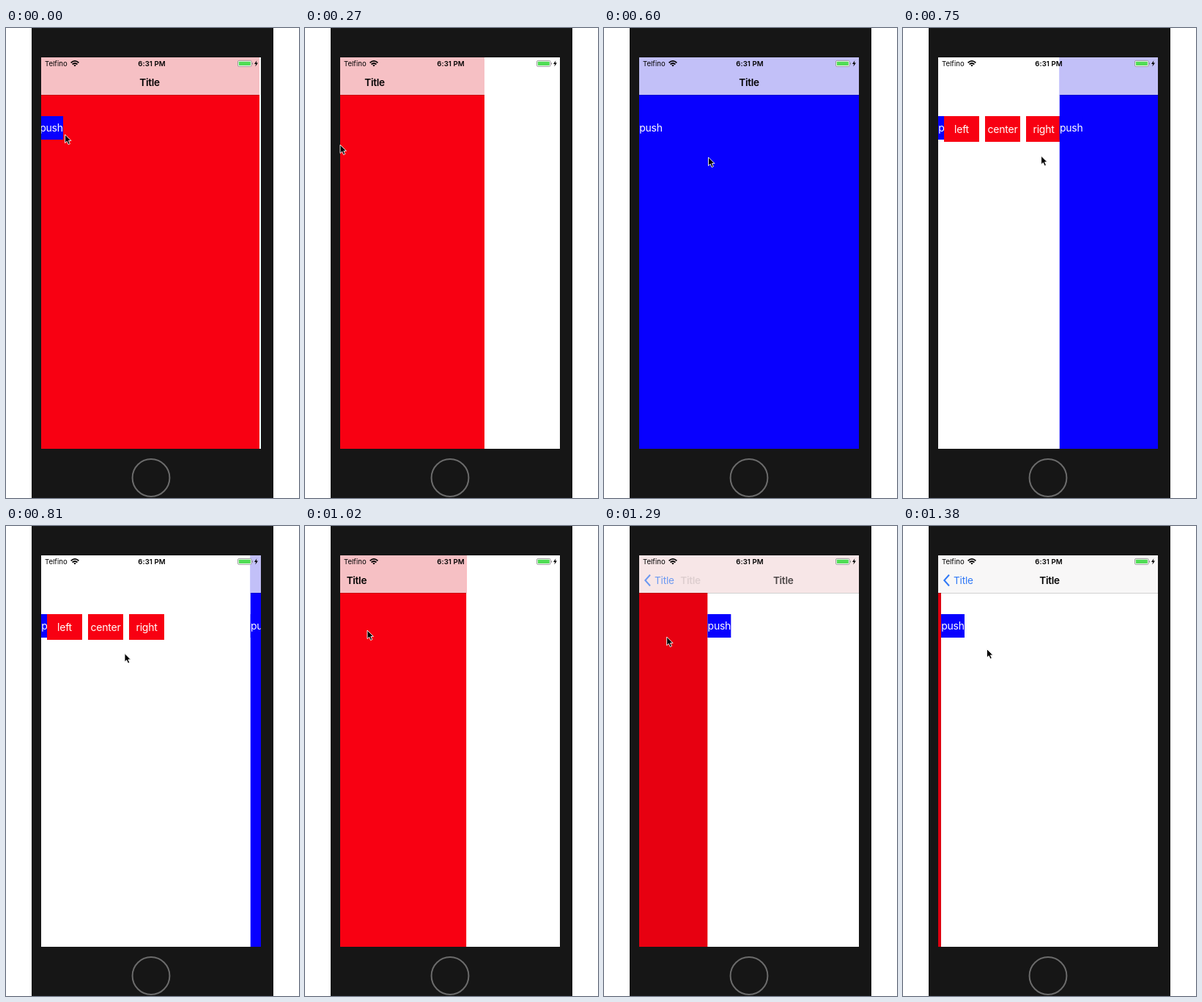
Write an HTML page that moves like this. It is 400 by 640 pixels and loops after 1410 ms.

```html
<!DOCTYPE html>
<html lang="en">
<head>
<meta charset="utf-8">
<title>Sliding pages</title>
<style>
  html, body { margin: 0; width: 100%; height: 100%; overflow: hidden; background: #fff; }
  svg { display: block; width: 400px; height: 640px; }
  text { font-family: Inter, sans-serif; fill: #000; }
  .label { font-size: 14px; letter-spacing: -.25px; fill: #fff; text-anchor: middle; }
  .title { font-size: 13.6px; font-weight: 600; letter-spacing: -.3px; text-anchor: middle; }
  .back { font-size: 13.6px; letter-spacing: -.2px; fill: #2f78f6; }
  .status { font-size: 9.6px; }
  .clock { font-weight: 600; text-anchor: middle; }
  .red { fill: #f80012; }
  .blue { fill: #0800ff; }
  .bar { fill: #f6f7f7; fill-opacity: .78; }
  .line { fill: #000; fill-opacity: .3; }
</style>
</head>
<body>
<svg viewBox="0 0 400 640">
  <defs>
    <clipPath id="screen"><rect width="300" height="533"/></clipPath>
    <g id="push">
      <rect class="blue" y="80" width="32" height="32"/>
      <text class="label" x="16" y="101">push</text>
    </g>
    <g id="navbar">
      <rect class="bar" width="300" height="51"/>
      <rect class="line" y="51" width="300" height=".6"/>
    </g>
  </defs>

  <rect x="35" width="330" height="640" fill="#161616"/>
  <circle cx="198" cy="612.5" r="25.4" fill="none" stroke="#6b6b6b" stroke-width="2"/>

  <g transform="translate(48 40)">
    <g clip-path="url(#screen)">
      <rect width="300" height="533" fill="#fff"/>
      <use href="#push"/>
      <g id="menu"></g>

      <g id="redPage" clip-path="url(#screen)">
        <g id="redBody">
          <rect class="red" width="300" height="533"/>
          <use href="#push"/>
        </g>
        <rect id="dim" width="300" height="533" opacity="0"/>
        <g id="detail">
          <rect y="51" width="300" height="482" fill="#fff"/>
          <use href="#push"/>
        </g>
        <rect class="red" width="300" height="51"/>
        <use href="#navbar"/>
        <rect id="plainBar" width="300" height="51" fill="#f8f8f8"/>
        <text id="oldTitle" class="title" y="39">Title</text>
        <text id="newTitle" class="title" y="39">Title</text>
        <g id="back">
          <path d="M15 26.5L8.3 34L15 41.5" fill="none" stroke="#2f78f6" stroke-width="2"/>
          <text class="back" x="21" y="39">Title</text>
        </g>
      </g>

      <g id="bluePage">
        <rect class="blue" width="300" height="533"/>
        <use href="#push"/>
        <use href="#navbar"/>
        <text class="title" x="150" y="39">Title</text>
      </g>
    </g>

    <text class="status" x="5" y="12">Telfino</text>
    <g fill="none" stroke="#000" stroke-width="1.7">
      <path d="M40.6 7.4Q46 2.4 51.4 7.4M42.6 9.5Q46 6.5 49.4 9.5"/>
      <path d="M44.3 10.8Q46 9.4 47.7 10.8L46 12.6Z" fill="#000" stroke="none"/>
    </g>
    <text class="status clock" x="151" y="12" letter-spacing=".1">6:31 PM</text>
    <rect x="268.5" y="4.4" width="18.6" height="8" rx="1.6" fill="#fff" stroke="#888" stroke-width=".8"/>
    <rect x="269.8" y="5.7" width="16" height="5.4" rx=".6" fill="#50dc55"/>
    <path d="M288 7v2.8q1-.3 1-1.4t-1-1.4Z" fill="#888"/>
    <path d="M294.4 4.2L291 9h2.2l-.9 3.6L296 7.6h-2.3Z"/>
  </g>

  <path id="cursor" d="M0 0V11.6L2.7 9.2L4.6 13.6L6.8 12.6L4.9 8.4H8.4Z"
        stroke="#fff" stroke-width=".9" stroke-linejoin="round"/>
</svg>
<script>
const LOOP = 1410, STEP = 30;
const $ = id => document.getElementById(id);

$('menu').innerHTML = ['left', 'center', 'right'].map((name, i) => `
  <g transform="translate(${8 + 56 * i} 80)">
    <rect class="red" width="48" height="35"/>
    <text class="label" x="24" y="22.8">${name}</text>
  </g>`).join('');

const linear = u => u;
const out = u => 1 - (1 - u) ** 2;
const smooth = u => u * u * (3 - 2 * u);

// Each key: time, value, easing of the move that ends there.
const redX = [[0, -2], [30, 0], [120, 0], [270, -103], [390, -300, out], [956, -300], [1140, 0, out]];
const blueX = [[420, 300], [570, 0, out], [640, 0], [720, 60], [839, 300, out]];
const pushed = [[1200, 0], [1403.5, 1, out]];
const cursorX = [[0, 80.5], [30, 80.5], [120, 151, smooth], [270, 48], [400, 202.5, smooth],
  [450, 202.5], [600, 142.5, smooth], [640, 142.5], [720, 202], [810, 162], [930, 85, smooth],
  [1100, 85], [1170, 70, smooth], [1230, 70], [1380, 114.5, smooth]];
const cursorY = [[0, 145], [120, 161, smooth], [270, 159], [400, 142, smooth], [450, 142],
  [600, 176, smooth], [810, 173.5], [930, 142, smooth], [1230, 142], [1380, 167.5, smooth]];

function at(keys, t) {
  const i = keys.findIndex(k => k[0] >= t);
  if (i < 0) return keys[keys.length - 1][1];
  if (i === 0) return keys[0][1];
  const [t0, a] = keys[i - 1];
  const [t1, b, ease = linear] = keys[i];
  return a + (b - a) * ease((t - t0) / (t1 - t0));
}

const move = (id, x, y = 0) => $(id).setAttribute('transform', `translate(${x} ${y})`);
const fade = (id, v) => $(id).setAttribute('opacity', v);

function draw(t) {
  const p = at(pushed, t);
  move('redPage', at(redX, t));
  move('bluePage', at(blueX, t));
  move('cursor', at(cursorX, t), at(cursorY, t));

  move('redBody', -90 * p);
  move('detail', 300 * (1 - p));
  move('oldTitle', 150 - 116 * p);
  move('newTitle', 150 + 150 * (1 - p));
  fade('dim', .1 * p);
  fade('oldTitle', (1 - p) ** 2);
  for (const id of ['plainBar', 'newTitle', 'back']) fade(id, p);
}

const start = performance.now();
function tick() {
  const t = (performance.now() - start) % LOOP;
  draw(Math.floor(t / STEP) * STEP);
  requestAnimationFrame(tick);
}
tick();
</script>
</body>
</html>
```
